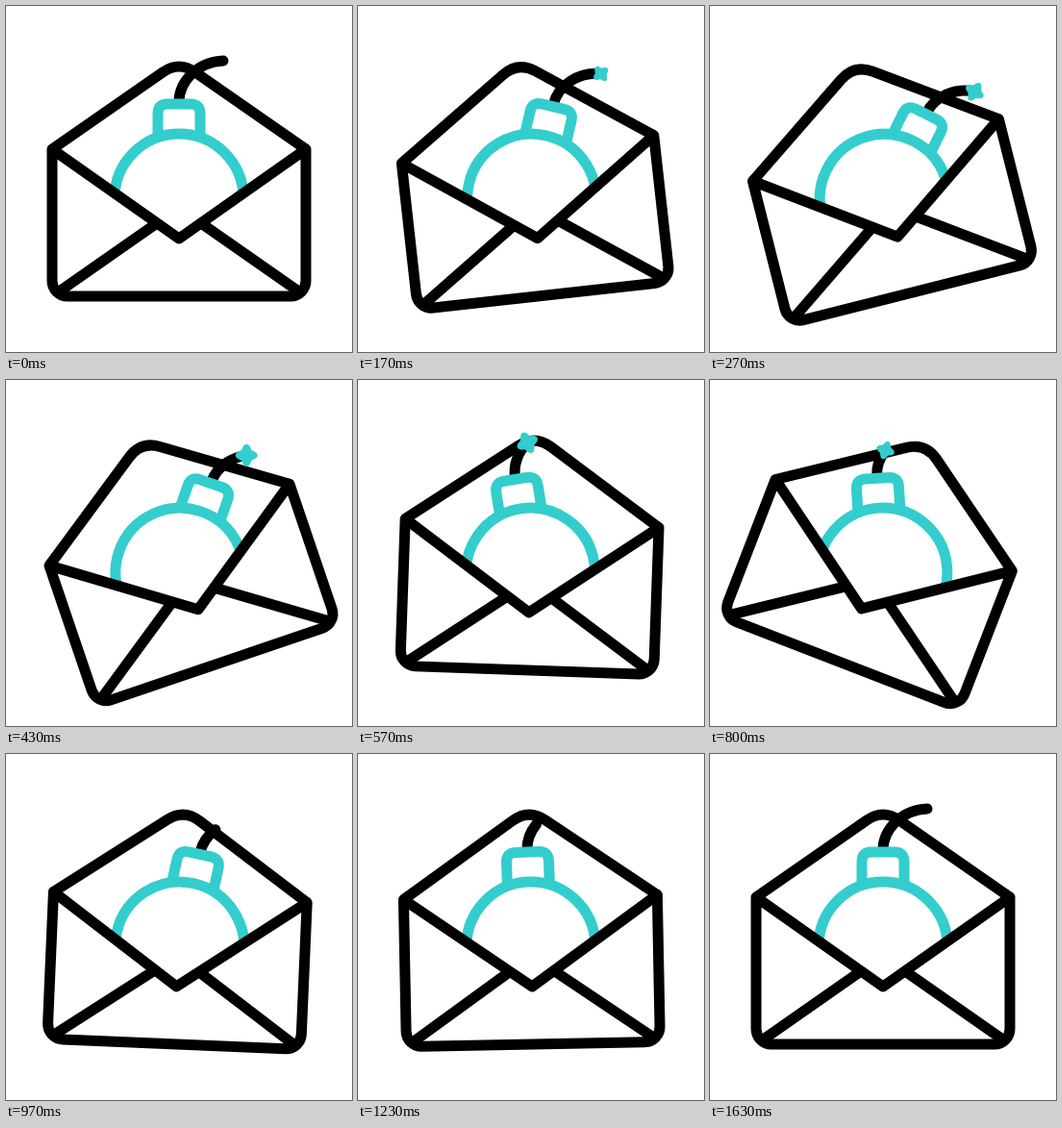
These frames come from a looping animation (360x360 px, 1670 ms). An HTML page:

```html
<!DOCTYPE html>
<html lang="en">
<head>
<meta charset="utf-8">
<title>Letter bomb</title>
<style>
  html, body { margin: 0; width: 100%; height: 100%; overflow: hidden; background: #fff; }
  svg { display: block; width: 100%; height: 100%; }
  .line { fill: none; stroke: #000; stroke-width: 11; stroke-linejoin: round; }
  .teal { fill: none; stroke: #33cdcd; stroke-width: 11; }
  #spark { fill: #33cdcd; }
</style>
</head>
<body>
<svg viewBox="0 0 360 360">
  <g class="envelope">
    <path class="line" d="M48 149L163 69Q180 57 197 69L312 149"/>
  </g>
  <g id="bomb">
    <path id="fuse" class="line" stroke-linecap="round" d="M180 100C180 78 200 58 226 57"/>
    <path class="teal" d="M158 136V112Q158 102 168 102H192Q202 102 202 112V136"/>
    <circle class="teal" cx="180" cy="200" r="67"/>
    <path id="spark"/>
  </g>
  <g class="envelope">
    <path class="line" style="fill: #fff" d="M48 149L180 242L312 149V286A16 16 0 0 1 296 302H64A16 16 0 0 1 48 286Z"/>
    <path class="line" d="M157 226L54 298M203 226L306 298"/>
  </g>
</svg>
<script>
const LOOP = 1670, STEP = 100 / 3, LAST = 49;
const SPARK_START = 2, SPARK_END = 28;

// Turning points of each swing: [step, degrees]
const envelopeSwing = [[0.8, 0], [12, -20], [22, 24], [32, -3.5], [40, 0]];
const bombSwing = [[0.8, 0], [10, 30], [20, -20], [28, 13], [36, -2.3], [46, 0]];

const envelopes = document.querySelectorAll('.envelope');
const [bomb, fuse, spark] = ['bomb', 'fuse', 'spark'].map(id => document.getElementById(id));
const fuseLength = fuse.getTotalLength();

const clamp = (x, lo, hi) => Math.min(hi, Math.max(lo, x));
const smooth = x => x * x * (3 - 2 * x);

// Eases through the turning points by adding up the eased legs.
function swingAt(turns, step) {
  return turns.slice(1).reduce((angle, [end, to], i) => {
    const [start, from] = turns[i];
    return angle + (to - from) * smooth(clamp((step - start) / (end - start), 0, 1));
  }, 0);
}

// A blob with four lobes that turn slowly while it burns.
function sparkPath(step) {
  const life = clamp((step - SPARK_START) / (SPARK_END - SPARK_START), 0, 1);
  const size = Math.sin(Math.PI * life) ** 0.25;
  const turn = -6.5 * (step - 13) * Math.PI / 180;
  const points = Array.from({ length: 32 }, (_, i) => {
    const a = i / 16 * Math.PI;
    const r = size * (9.7 + 2 * Math.cos(4 * (a - turn)));
    return `${r * Math.cos(a)} ${r * Math.sin(a)}`;
  });
  return `M${points.join('L')}Z`;
}

function draw(step) {
  const tilt = swingAt(envelopeSwing, step);
  envelopes.forEach(el => el.setAttribute('transform', `rotate(${tilt} 180 180)`));

  const swing = swingAt(bombSwing, step);
  bomb.setAttribute('transform', `rotate(${swing} 180 203)`);

  const burnt = step === LAST ? 0 : clamp(0.0295 * (step - 2.5), 0, 0.58);
  const left = (1 - burnt) * fuseLength;
  fuse.setAttribute('stroke-dasharray', `${left} 200`);

  const tip = fuse.getPointAtLength(left);
  const burning = step > SPARK_START && step < SPARK_END;
  spark.setAttribute('visibility', burning ? 'visible' : 'hidden');
  spark.setAttribute('transform', `translate(${tip.x} ${tip.y}) rotate(${-swing})`);
  spark.setAttribute('d', sparkPath(step));
}

function tick() {
  const time = performance.now() % LOOP;
  draw(Math.min(LAST, Math.floor(time / STEP + 0.15)));
  requestAnimationFrame(tick);
}
tick();
</script>
</body>
</html>
```
